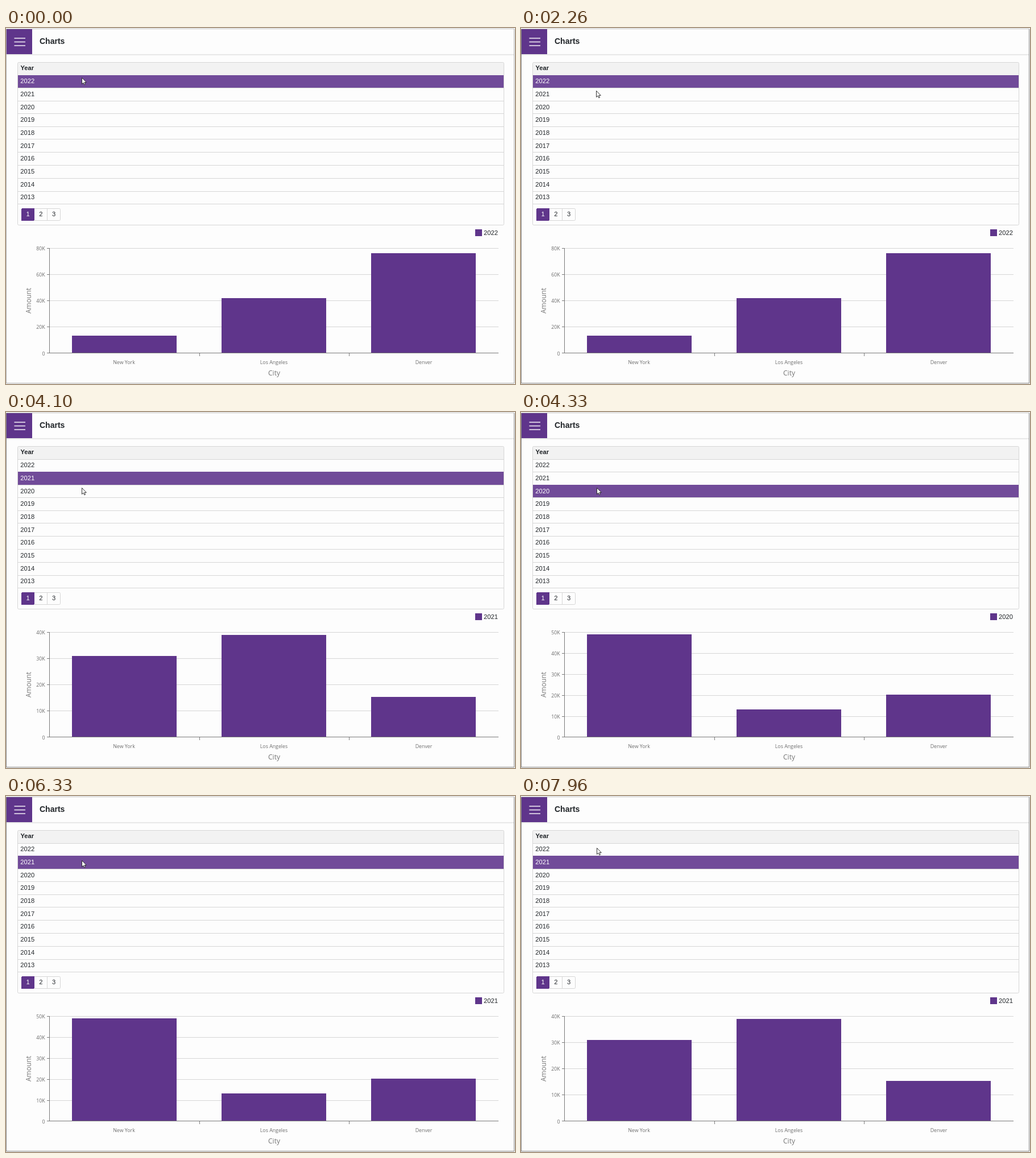
An HTML page for the animation above (8000 ms loop, 895x626 px).

```html
<!DOCTYPE html>
<html lang="en">
<head>
<meta charset="utf-8">
<title>Charts</title>
<style>
html, body { margin: 0; width: 100%; height: 100%; overflow: hidden; background: #fdfdfd; }
svg { display: block; width: 895px; height: 626px; }
rect { shape-rendering: crispEdges; }
text { font: 11.2px "Liberation Sans", Arial, sans-serif; fill: #212529; }
.bold { font-weight: bold; }
.title { font-size: 14px; }
.mid { text-anchor: middle; }
.tick { font: 8.8px "Open Sans", "Noto Sans", sans-serif; fill: #6e6e6e; }
.axis { font: 12px "Open Sans", "Noto Sans", sans-serif; fill: #767676; }
.end { text-anchor: end; }
</style>
</head>
<body>
<svg id="stage" viewBox="0 0 895 626"></svg>
<script>
const PURPLE = '#5f358b', LINE = '#d6d6d6', AXIS = '#7a7a7a', INK = '#212529';
const LOOP = 8000;
const stage = document.getElementById('stage');

function add(parent, tag, attrs, text) {
  const el = document.createElementNS('http://www.w3.org/2000/svg', tag);
  for (const name in attrs) el.setAttribute(name, attrs[name]);
  if (text !== undefined) el.textContent = text;
  parent.append(el);
  return el;
}
const rect = (x, y, width, height, fill, parent = stage, extra = {}) =>
  add(parent, 'rect', { x, y, width, height, fill, ...extra });
const label = (x, y, text, cls = '', parent = stage) =>
  add(parent, 'text', { x, y, class: cls }, text);
const outline = (x, y, width, height) =>
  add(stage, 'rect', { x, y, width, height, rx: 2, fill: 'none', stroke: LINE, style: 'shape-rendering:auto' });

// Header and window frame
rect(0, 0, 895, 626, '#fdfdfd');
rect(0, 1, 894, 1, '#c4c4c4');
[['#e4e4e4', 46], ['#efefef', 47], ['#f8f8f8', 48]].forEach(([c, y]) => rect(1, y, 892, 1, c));
const frame = add(stage, 'g', {});
rect(0, 2, 1, 623, 'inherit', frame);
rect(893, 2, 1, 623, 'inherit', frame);
rect(0, 624, 894, 1, 'inherit', frame);
for (const r of frame.children) r.removeAttribute('fill');
rect(1, 2, 45, 44, PURPLE);
for (const y of [18, 24.5, 31])
  add(stage, 'path', { d: `M14.5 ${y}H34`, stroke: '#fff', 'stroke-width': 1.4 });
label(59, 28, 'Charts', 'bold title');

// Year table
const rowLines = [83, 105, 128, 150, 173, 195, 218, 241, 264, 287, 309];
rect(21, 61, 854, 22, '#f2f2f2');
rowLines.forEach(y => rect(21, y, 854, 1, LINE));
const highlight = rect(21, 83, 854, 22, '#714b99');
outline(20.5, 60.5, 855, 286);
label(25.5, 74, 'Year', 'bold');
const rows = rowLines.slice(0, 10).map((_, i) =>
  label(25.3, Math.round(93.2 + 22.68 * i) + 4, 2022 - i));

// Pager
outline(27.5, 317.5, 68, 21);
rect(27, 317, 23, 22, PURPLE, stage, { rx: 2 });
rect(72, 317, 1, 22, LINE);
[38.7, 61.3, 84].forEach((x, i) => label(x, 331, i + 1, 'mid'));
stage.lastChild.previousSibling.previousSibling.style.fill = '#fff';

// Chart
rect(825, 354, 12, 12, PURPLE);
const legend = label(840, 364, '');
const LEFT = 77, TOP = 387, BASE = 572, BAND = 263;
const cities = ['New York', 'Los Angeles', 'Denver'];

function buildChart(max, tops) {
  const g = add(stage, 'g', {});
  const steps = max === 50 ? 5 : 4;
  for (let i = 0; i <= steps; i++) {
    const y = Math.floor(TOP + (BASE - TOP) * i / steps);
    const value = max * (steps - i) / steps;
    if (i < steps) rect(LEFT, y, 789, 1, LINE, g);
    rect(72, y - (i === steps), 5, 1, AXIS, g);
    label(68.6, y + 4, value ? value + 'K' : '0', 'tick end', g);
  }
  tops.forEach((y, i) => rect(LEFT + BAND * i + 39, y, 184, BASE - 1 - y, PURPLE, g));
  return g;
}
const charts = {
  2022: buildChart(80, [541, 475, 396]),
  2021: buildChart(40, [429, 392, 501]),
  2020: buildChart(50, [391, 523, 497])
};
rect(LEFT - 1, TOP, 1, BASE - TOP, AXIS);
rect(LEFT - 1, BASE - 1, 790, 1, AXIS);
[340, 603].forEach(x => rect(x, BASE, 1, 5, AXIS));
cities.forEach((city, i) => label(LEFT + BAND * (i + .5) - 1 + i * .5, 590.5, city, 'tick mid'));
label(471.5, 611, 'City', 'axis mid');
add(stage, 'text', { class: 'axis mid', transform: 'translate(43.5 479.5) rotate(-90)' }, 'Amount');

const cursor = add(stage, 'path', {
  d: 'M.5 .5V11.6L3.1 9.2L4.8 12.9L6.5 12.2L4.9 8.6H8.3Z',
  fill: '#fff', stroke: '#222', 'stroke-width': .9
});

// Pointer moves: start, end, steps, from, to, sideways bow
const moves = [
  [1400, 2130, 20, [133, 87], [132, 110], -2.5],
  [3500, 4100, 16, [132, 110], [133, 133], 0],
  [5530, 6030, 15, [133, 133], [133, 113], 0],
  [7300, 7960, 20, [133, 113], [133, 91], 0]
];
const rowTimes = [[0, 2022], [2360, 2021], [4300, 2020], [6330, 2021]];
const chartTimes = [[0, 2022], [2360, 2021], [4330, 2020], [6400, 2021]];
const valueAt = (table, t) => table.filter(([start]) => start <= t).pop()[1];

function pointerAt(t) {
  const move = moves.filter(([start]) => start <= t).pop();
  if (!move) return moves[0][3];
  const [start, end, steps, from, to, bow] = move;
  const k = Math.min(steps, 1 + Math.floor((t - start) / (end - start) * (steps - 1)));
  const p = k / steps;
  const eased = (p + p * p * (3 - 2 * p)) / 2;
  return [0, 1].map(i => Math.round(
    from[i] + (to[i] - from[i]) * eased + (i ? 0 : bow * Math.sin(Math.PI * p))));
}

function render(t) {
  const year = valueAt(rowTimes, t), shown = valueAt(chartTimes, t);
  const index = 2022 - year;
  highlight.setAttribute('y', rowLines[index]);
  highlight.setAttribute('height', rowLines[index + 1] - rowLines[index]);
  rows.forEach((row, i) => row.style.fill = i === index ? '#fff' : INK);
  legend.textContent = year;
  for (const key in charts) charts[key].style.display = +key === shown ? '' : 'none';
  frame.style.fill = t < 2260 ? '#adadad' : '#868686';
  cursor.setAttribute('transform', `translate(${pointerAt(t)})`);
}

const began = performance.now();
function tick() {
  render((performance.now() - began) % LOOP);
  requestAnimationFrame(tick);
}
tick();
</script>
</body>
</html>
```
